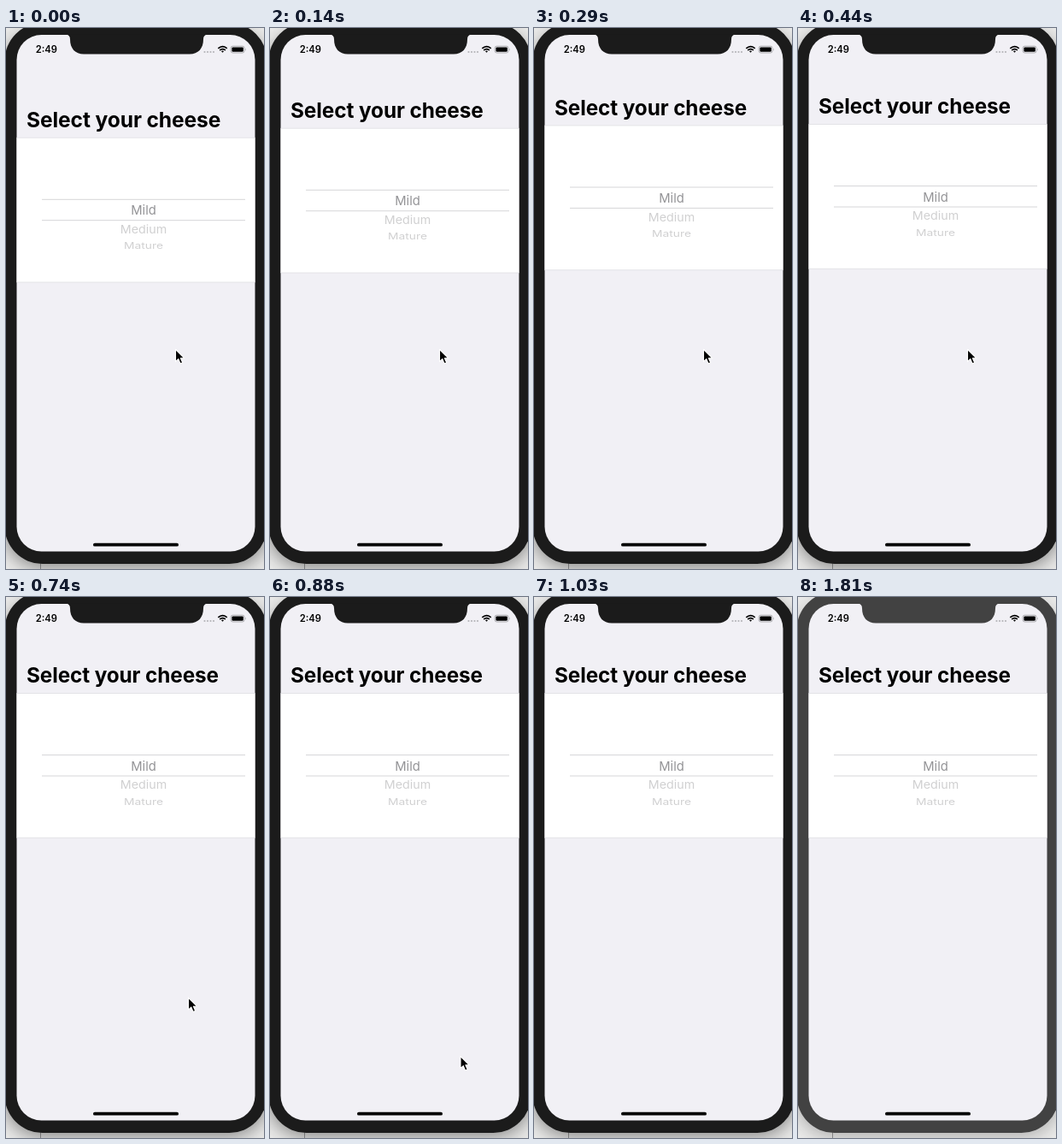
These frames come from a looping animation (302 px wide and 632 px high, 1.91 s). An HTML page:

```html
<!DOCTYPE html>
<html lang="en">
<head>
<meta charset="utf-8">
<style>
  html, body { margin: 0; width: 100%; height: 100%; overflow: hidden; background: #ececeb; }
  svg { display: block; width: 302px; height: 632px; font-family: Inter, "Liberation Sans", sans-serif; }
  .wheel text { text-anchor: middle; }
  .rule { stroke: #d6d6d8; }
</style>
</head>
<body>
<svg viewBox="0 0 302 632">
  <defs>
    <filter id="blur" x="-20%" y="-20%" width="140%" height="140%"><feGaussianBlur stdDeviation="11"/></filter>
  </defs>

  <path d="M40.5 620V632" stroke="#999"/>
  <rect id="shadow" x="-2" y="4" width="308" height="626" rx="44" filter="url(#blur)"/>
  <g id="bezel">
    <rect x="-1.5" y="-6" width="307" height="632" rx="44"/>
    <rect x="12.5" y="8" width="279" height="603.5" rx="29" fill="#f1f0f5"/>
    <path d="M70 7.5q5 .5 5 5.500c0 11 6 17.500 16 17.500h124c10 0 16-6.500 16-17.500q0-5 5-5.500z"/>
  </g>

  <!-- status bar -->
  <text x="34.800" y="29" font-size="11.200" font-weight="600">2:49</text>
  <g fill="#b4b4b8">
    <circle cx="232.500" cy="28" r="1.100"/><circle cx="236" cy="28" r="1.100"/>
    <circle cx="239.500" cy="28" r="1.100"/><circle cx="243" cy="28" r="1.100"/>
  </g>
  <g fill="none" stroke="#000" stroke-width="1.700">
    <path d="M248.300 23.900Q253.500 19.300 258.700 23.900M250.200 26Q253.500 23.200 256.800 26"/>
    <path d="M252 27.200Q253.500 26 255 27.200L253.500 28.700z" fill="#000" stroke="none"/>
  </g>
  <rect x="263.200" y="21.200" width="15.800" height="7.800" rx="2.200" fill="none" stroke="#9a9a9d" stroke-width=".8"/>
  <rect x="264.400" y="22.400" width="13.400" height="5.400" rx="1.200"/>
  <path d="M280 23.700q1.300 1.400 0 2.800z" fill="#9a9a9d"/>

  <!-- sliding content -->
  <g id="content">
    <g transform="translate(24 100.200)">
      <text id="title" font-size="24.300" font-weight="700" letter-spacing="-.1">Select your cheese</text>
    </g>
    <rect x="12.500" y="112.500" width="279" height="168.800" fill="#fff"/>
    <path d="M12.500 112.500h279M12.500 281.300h279" stroke="#dfdfe3" stroke-width=".8"/>
    <path class="rule" d="M42 184.600H280M42 209H280"/>
    <g class="wheel">
      <text x="161" y="202.700" font-size="14.800" fill="#949497">Mild</text>
      <text transform="translate(161 224.200) scale(1 .93)" font-size="14.300" fill="#d0d0d1">Medium</text>
      <text transform="translate(161 242.600) scale(1 .77)" font-size="13.800" fill="#d0d0d1">Mature</text>
    </g>
  </g>

  <rect x="102" y="601.800" width="100" height="3.800" rx="1.900"/>
  <path id="cursor" d="M0 0V14.200L3.300 11.200L5.600 16.600L8.200 15.500L5.900 10.300H10.300z"
        stroke="#fff" stroke-width="1.100" stroke-linejoin="round"/>
</svg>
<script>
  const LOOP = 1910;
  const SETTLE = [140, 290, 440];
  const BLUR_AT = 1810;
  // time, then pointer tip
  const POINTER = [[0, 198.5, 375.5], [590, 200.5, 399.5], [740, 213.5, 468], [880, 223, 536.5]];
  const POINTER_GONE = 1030;

  const get = id => document.getElementById(id);
  const [content, title, cursor, bezel, shadow] =
    ['content', 'title', 'cursor', 'bezel', 'shadow'].map(get);

  function draw(t) {
    const steps = SETTLE.filter(s => t >= s).length;
    const rest = steps < 3 ? 0.3 ** steps : 0;
    content.setAttribute('transform', `translate(0 ${15.7 * rest})`);
    title.setAttribute('transform', `scale(${1 + 0.011 * rest})`);

    const [, x, y] = POINTER.filter(p => t >= p[0]).pop();
    cursor.setAttribute('transform', `translate(${x} ${y})`);
    cursor.style.display = t < POINTER_GONE ? '' : 'none';

    const inactive = t >= BLUR_AT;
    bezel.setAttribute('fill', inactive ? '#424242' : '#1b1b1b');
    shadow.setAttribute('opacity', inactive ? 0.28 : 0.45);
  }

  const start = performance.now();
  function tick() {
    draw((performance.now() - start) % LOOP);
    requestAnimationFrame(tick);
  }
  tick();
</script>
</body>
</html>
```
